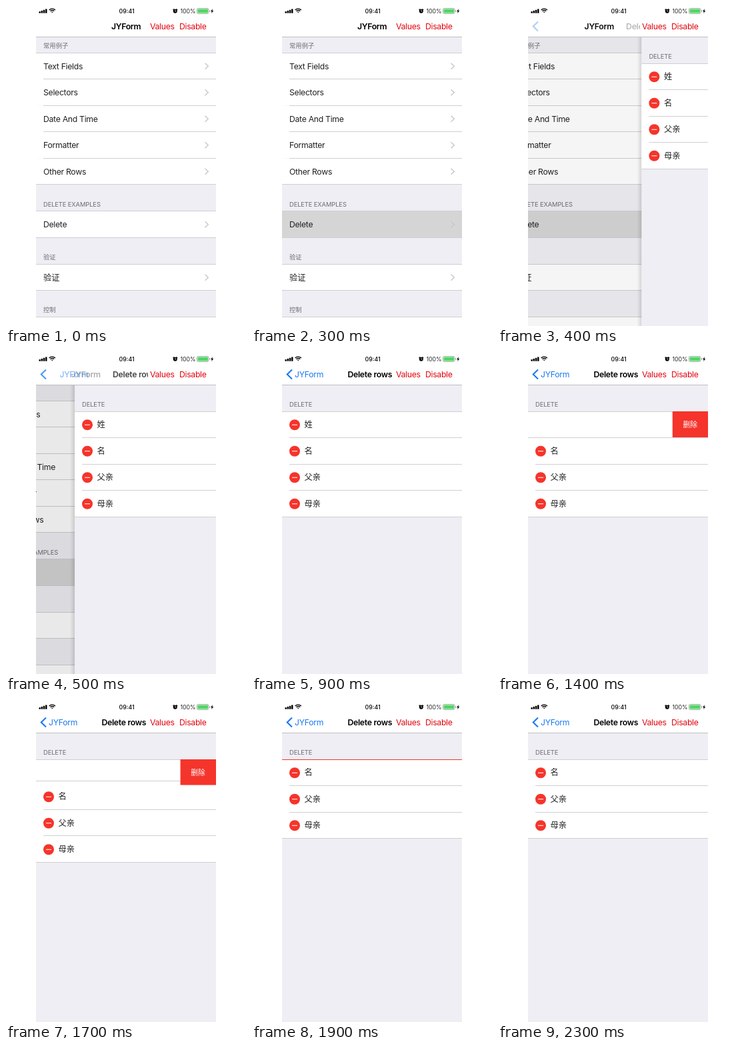
Animation of 360 by 480 pixels, one loop 2.4 s. Source, as an HTML page with a canvas:

```html
<!DOCTYPE html>
<html lang="en">
<head>
<meta charset="utf-8">
<title>Form demo</title>
<style>
  html, body { margin: 0; width: 100%; height: 100%; overflow: hidden; background: #fff; }
  canvas { display: block; }
</style>
</head>
<body>
<canvas id="stage" width="360" height="480"></canvas>
<script>
const ctx = document.getElementById('stage').getContext('2d');
const LOOP = 2400, STEP = 100;
const LEFT = 45, RIGHT = 315, WIDTH = RIGHT - LEFT, ROW = 39.5;
const RED = '#f5342b', BLUE = '#1b7af2', ACTION = '#e2060f';
const GREY = '#eeeef4', LINE = '#cfcfd3', INK = '#222', HINT = '#6d6d72';
const FONT = 'Inter, "Noto Sans CJK SC", "Noto Sans CJK", sans-serif';

const clamp = v => Math.max(0, Math.min(1, v));
const smooth = v => { v = clamp(v); return v * v * (3 - 2 * v); };

function rect(x, y, w, h, color) {
  ctx.fillStyle = color;
  ctx.fillRect(x, y, w, h);
}

function rule(x, y, color = LINE) {
  rect(x, Math.floor(y), RIGHT - x, 1, color);
}

// Text is centred vertically on y by its cap height.
function text(str, x, y, { size = 12.24, weight = 400, color = INK, track = -0.3, align = 'left' } = {}) {
  ctx.font = `${weight} ${size}px ${FONT}`;
  ctx.letterSpacing = (/[\u4e00-\u9fff]/.test(str) ? 0 : track) + 'px';
  ctx.textAlign = align;
  ctx.fillStyle = color;
  ctx.fillText(str, x, y + size * 0.364);
}

const heading = (str, x, y) => text(str, x, y, { size: 9.36, color: HINT, track: -0.1 });

function stroke(points, color, width) {
  ctx.beginPath();
  points.forEach(([x, y]) => ctx.lineTo(x, y));
  ctx.strokeStyle = color;
  ctx.lineWidth = width;
  ctx.stroke();
}

function clipped(x, y, w, h, draw) {
  ctx.save();
  ctx.beginPath();
  ctx.rect(x, y, w, h);
  ctx.clip();
  draw();
  ctx.restore();
}

function faded(alpha, draw) {
  ctx.save();
  ctx.globalAlpha = clamp(alpha);
  draw();
  ctx.restore();
}

function statusBar() {
  [2.5, 3.7, 4.9, 6.2].forEach((h, i) => rect(49.5 + i * 3.2, 10.7 - h, 2.4, h, '#000'));
  ctx.strokeStyle = '#000';
  ctx.lineWidth = 1.4;
  for (const r of [6.3, 3.9, 1.2]) {
    ctx.beginPath();
    ctx.arc(69.3, 10.4, r, -Math.PI * 0.76, -Math.PI * 0.24);
    ctx.stroke();
  }
  text('09:41', 181, 7.6, { size: 8.64, weight: 600, track: 0, align: 'center' });
  ctx.fillStyle = '#000';
  ctx.beginPath();
  ctx.arc(253.8, 7.8, 3, 0, 7);
  ctx.fill();
  stroke([[250.5, 6], [252.3, 4.3]], '#000', 1.1);
  stroke([[255.3, 4.3], [257.1, 6]], '#000', 1.1);
  stroke([[253.8, 6], [253.8, 8], [255.3, 8]], '#fff', 0.7);
  text('100%', 261.6, 7.6, { size: 8.64, track: 0 });
  ctx.strokeStyle = '#999';
  ctx.lineWidth = 0.8;
  ctx.beginPath();
  ctx.roundRect(286.4, 3.5, 17.6, 8, 2);
  ctx.stroke();
  rect(287.5, 4.6, 15.4, 5.8, '#4cd964');
  rect(304.8, 6.2, 1, 2.6, '#999');
  ctx.fillStyle = '#000';
  ctx.beginPath();
  [[310, 4], [307, 8.2], [308.9, 8.2], [308.2, 11.2], [311.2, 6.9], [309.4, 6.9]]
    .forEach(([x, y]) => ctx.lineTo(x, y));
  ctx.fill();
}

function navBar(push) {
  const slide = 77;
  rect(LEFT, 0, WIDTH, 46, '#fff');
  rule(LEFT, 46, '#bdbdc1');
  statusBar();
  faded(1.5 * (1 - push), () => text('JYForm', 158 - slide * push, 30.5, { weight: 600, color: '#000' }));
  faded(push, () => stroke([[60, 23.6], [52.8, 30.6], [60, 37.6]], BLUE, 2.1));
  faded(push ** 2 * (push > 0.4), () => text('JYForm', 64 + slide * (1 - push), 30.5, { color: BLUE }));
  clipped(LEFT, 0, 168, 46, () => faded(push ** 1.3, () =>
    text('Delete rows', 143.5 + slide * (1 - push), 30.5, { weight: 600, color: '#000' })));
  text('Values', 216, 30.5, { color: ACTION });
  text('Disable', 260, 30.5, { color: ACTION });
}

function menuRow(label, x, top, color = '#fff') {
  const mid = top + ROW / 2;
  rect(LEFT, top, WIDTH, ROW, color);
  text(label, x + 11, mid);
  stroke([[x + 253.5, mid - 4.5], [x + 258.3, mid], [x + 253.5, mid + 4.5]], '#c7c7cc', 1.4);
}

function menuPage(push, pressed) {
  const x = LEFT - 81 * push;
  rect(LEFT, 47, WIDTH, 433, GREY);
  heading('常用例子', x + 11, 60);
  ['Text Fields', 'Selectors', 'Date And Time', 'Formatter', 'Other Rows'].forEach((label, i) => {
    menuRow(label, x, 70.5 + i * ROW);
    rule(i ? Math.max(LEFT, x + 11) : LEFT, 70 + i * ROW);
  });
  rule(LEFT, 267);
  heading('DELETE EXAMPLES', x + 11, 297.5);
  menuRow('Delete', x, 308, pressed ? '#d5d5d5' : '#fff');
  heading('验证', x + 11, 377);
  menuRow('验证', x, 387.5);
  heading('控制', x + 11, 456);
  rect(LEFT, 467, WIDTH, 13, '#fff');
  [307, 347, 387, 426, 466].forEach(y => rule(LEFT, y));
  rect(LEFT, 47, WIDTH, 433, `rgba(0,0,0,${0.11 * push})`);
}

function editRow(label, x, mid) {
  ctx.fillStyle = RED;
  ctx.beginPath();
  ctx.arc(x + 19, mid, 8, 0, 7);
  ctx.fill();
  rect(x + 15, mid - 0.5, 8, 1, '#fff');
  text(label, x + 33.5, mid - 0.4);
}

function deletePage(x, swipe, collapse) {
  const top = 86.5, shift = ROW * collapse, bottom = top + 4 * ROW - shift;
  const drag = 53.5 * swipe;
  rect(x, 47, WIDTH, 433, GREY);
  heading('DELETE', x + 11, 76);
  rect(x, top, WIDTH, bottom - top, '#fff');
  rule(x, 86);
  if (collapse < 1) {
    editRow('姓', x - drag, top + ROW / 2 - shift);
    const y = top + ROW - 2 * shift;
    if (y > top) rule(Math.max(x, x + 11 - drag), y - 0.5);
  }
  ['名', '父亲', '母亲'].forEach((label, i) => {
    const y = top + (i + 1) * ROW - shift;
    editRow(label, x, y + ROW / 2);
    if (i) rule(x + 11, y - 0.5);
  });
  rule(x, bottom - 0.5);
}

function deleteButton(swipe, collapse) {
  const width = 53.5 * swipe + 216.5 * collapse ** 3;
  const height = Math.max(1, 39 * (1 - collapse ** 2));
  clipped(RIGHT - width, 86, width, height, () => {
    rect(RIGHT - width, 86, width, height, RED);
    if (collapse < 1) {
      text('删除', RIGHT - width + 26.7, 106, { size: 10.8, weight: 500, color: '#fff', align: 'center' });
    }
  });
}

function pushAt(t) {
  if (t >= 700) return 1;
  const s = Math.max(0, t - 320) / 1000 * 16.1;
  return 1 - (1 + s) * Math.exp(-s);
}

function draw(t) {
  const push = pushAt(t);
  const swipe = smooth((t - 1050) / 300);
  const collapse = smooth((t - 1655) / 245);
  rect(0, 0, 360, 480, '#fff');
  clipped(LEFT, 0, WIDTH, 480, () => {
    if (push < 1) menuPage(push, t >= 200);
    if (push > 0) {
      const x = LEFT + WIDTH * (1 - push);
      if (push < 1) {
        const shade = ctx.createLinearGradient(x - 7, 0, x, 0);
        shade.addColorStop(0, 'rgba(0,0,0,0)');
        shade.addColorStop(1, 'rgba(0,0,0,0.13)');
        rect(x - 7, 47, 7, 433, shade);
      }
      deletePage(x, swipe, collapse);
    }
    if (swipe > 0 && t < 2000) deleteButton(swipe, collapse);
    navBar(push);
  });
}

const start = performance.now();
function tick() {
  const t = (performance.now() - start) % LOOP;
  draw(Math.floor(t / STEP) * STEP);
  requestAnimationFrame(tick);
}
tick();
</script>
</body>
</html>
```
